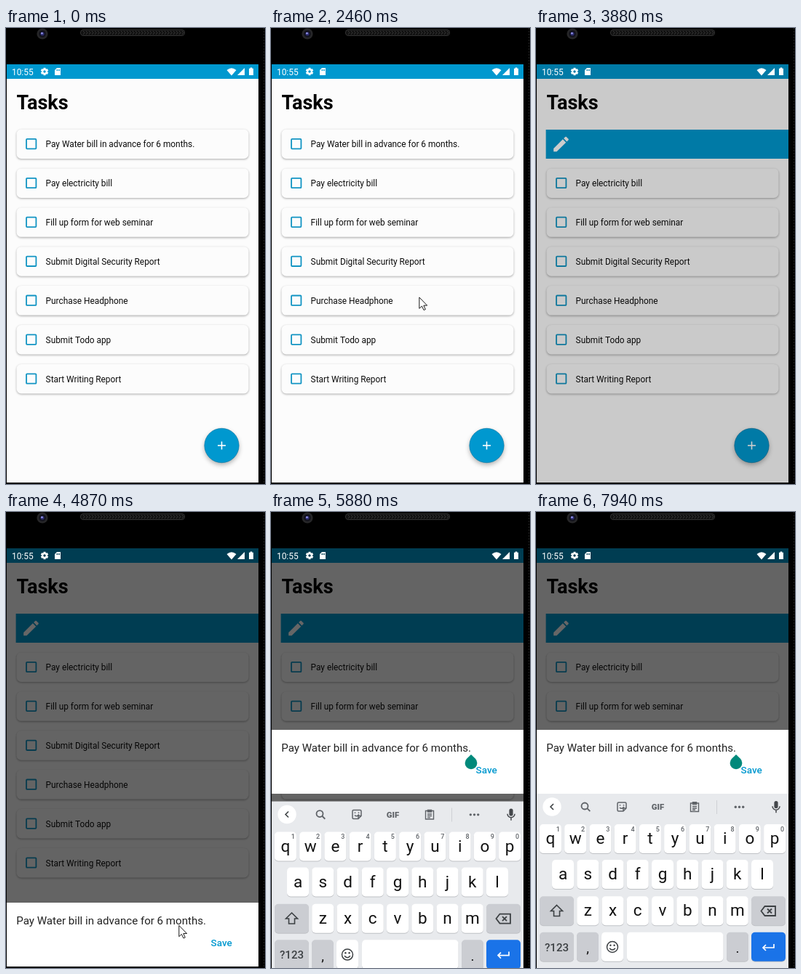
Write an HTML page with a canvas that moves like this. It is 356 by 628 pixels and loops after 8000 ms.

```html
<!DOCTYPE html>
<html lang="en">
<head>
<meta charset="utf-8">
<title>Tasks</title>
<style>
html, body { margin: 0; width: 100%; height: 100%; overflow: hidden; background: #000; }
canvas { display: block; width: 356px; height: 628px; }
</style>
</head>
<body>
<canvas id="stage"></canvas>
<script>
const W = 356, H = 628, LOOP = 8000, BEAT = 130;
const FONT = 'Roboto, sans-serif';
const BLUE = '#0098cf', PAPER = '#fcfcfc', TEAL = '#00897b', GREY = '#5f6368', INK = '#3c4043';
const SHEET = 88, BOARD = 240;
const DIM_AT = 3880, OPEN_AT = 4010, TYPE_AT = 5520;
const canvas = document.getElementById('stage');
const ctx = canvas.getContext('2d');
const ratio = window.devicePixelRatio || 1;
canvas.width = W * ratio;
canvas.height = H * ratio;

const tasks = [
  'Pay Water bill in advance for 6 months.',
  'Pay electricity bill',
  'Fill up form for web seminar',
  'Submit Digital Security Report',
  'Purchase Headphone',
  'Submit Todo app',
  'Start Writing Report'
];

// Pointer strokes: when each is visible, and the turning points as [ms, x, y].
const strokes = [
  { from: 410, to: 1720, path: [[410, 139, 570], [900, 73, 172], [1190, 76, 158], [1400, 112, 160], [1650, 200, 169]] },
  { from: 2080, to: 3450, path: [[2080, 290, 200], [2460, 209, 378], [2730, 56, 165], [3340, 82, 167]] },
  { from: 4150, to: TYPE_AT, path: [[4150, 256, 276], [4480, 66, 500], [4800, 236, 569], [5110, 276, 555]] }
];

const part = (t, a, b) => Math.min(1, Math.max(0, (t - a) / (b - a)));
const smooth = p => p * p * (3 - 2 * p);

const refresh = t => Math.floor((t + 20) / BEAT) * BEAT;

function pointerAt(t) {
  const stroke = strokes.find(s => t >= s.from && t < s.to);
  if (!stroke) return null;
  const now = refresh(t);
  let [, x, y] = stroke.path[0];
  stroke.path.forEach(([end, nx, ny], i) => {
    if (!i) return;
    const p = part(now, stroke.path[i - 1][0], end);
    x += (nx - x) * p;
    y += (ny - y) * p;
  });
  return [x, y];
}

// First a swipe that springs back, then one that throws the card away.
function swipeAt(t) {
  const now = refresh(t);
  const tried = 200 * smooth(part(now, 1400, 1850)) * (1 - part(now, 1950, 2200));
  return tried + 345 * part(now, 3120, 3590) ** 2.6;
}

function rect(x, y, w, h, color) {
  ctx.fillStyle = color;
  ctx.fillRect(x, y, w, h);
}

function round(x, y, w, h, r, color) {
  ctx.beginPath();
  ctx.roundRect(x, y, w, h, r);
  ctx.fillStyle = color;
  ctx.fill();
}

function disc(x, y, r, color) {
  ctx.beginPath();
  ctx.arc(x, y, r, 0, Math.PI * 2);
  ctx.fillStyle = color;
  ctx.fill();
}

function ring(x, y, r, color, line) {
  ctx.beginPath();
  ctx.arc(x, y, r, 0, Math.PI * 2);
  ctx.strokeStyle = color;
  ctx.lineWidth = line;
  ctx.stroke();
}

function text(str, x, y, size, color, weight = 400, align = 'left') {
  ctx.font = `${weight} ${size}px ${FONT}`;
  ctx.textAlign = align;
  ctx.fillStyle = color;
  ctx.fillText(str, x, y);
}

function icon(path, x, y, color, line, scale = 1) {
  ctx.save();
  ctx.translate(x, y);
  ctx.scale(scale, scale);
  const p = new Path2D(path);
  if (line) {
    ctx.strokeStyle = color;
    ctx.lineWidth = line;
    ctx.stroke(p);
  } else {
    ctx.fillStyle = color;
    ctx.fill(p, 'evenodd');
  }
  ctx.restore();
}

function shadowed(blur, dy, alpha, draw) {
  ctx.save();
  ctx.shadowColor = `rgba(0,0,0,${alpha})`;
  ctx.shadowBlur = blur * ratio;
  ctx.shadowOffsetY = dy * ratio;
  draw();
  ctx.restore();
}

function phone() {
  rect(0, 0, W, H, '#000');
  disc(50, 8, 7.6, '#262628');
  disc(50, 8, 4.8, '#12121c');
  disc(50, 8, 2.6, '#2d2d70');
  disc(49.4, 7.3, 1.3, '#9a9af0');
  round(102, 2, 144, 9, 4.5, '#333');
  round(103, 3, 142, 7, 3.5, '#111');
  ctx.strokeStyle = '#3a3a3a';
  ctx.lineWidth = 1;
  ctx.beginPath();
  for (let x = 106; x < 243; x += 4) {
    ctx.moveTo(x, 4);
    ctx.lineTo(x + 2, 6.5);
    ctx.lineTo(x, 9);
  }
  ctx.stroke();
  for (let y = 0; y < H; y += 4) rect(354, y, 1, 2, '#222');
}

function statusIcons() {
  const c = '#fff';
  text('10:55', 8, 65, 11.9, c);
  ctx.save();
  ctx.translate(53, 60);
  for (let i = 0; i < 6; i++) {
    rect(-1.5, -5.2, 3, 3, c);
    ctx.rotate(Math.PI / 3);
  }
  ctx.restore();
  ring(53, 60, 2.8, c, 2.2);
  icon('M3 0H8V10H0V3ZM2.4 2V4H3.4V2ZM4.2 2V4H5.2V2ZM6 2V4H7V2Z', 67, 55, c);
  icon('M0 3Q6.5 -2.6 13 3L6.5 10.5Z', 303.5, 55, c);
  icon('M10 0V10H0Z', 318, 55, c);
  icon('M0 1.2H1.7V0H4.3V1.2H6V10.5H0Z', 334, 54.6, c);
}

function card(i, dx) {
  ctx.save();
  ctx.translate(dx, 139.5 + i * 53.9);
  shadowed(3, 1.1, 0.32, () => round(14.5, 0, 319, 40.5, 6.5, PAPER));
  ctx.strokeStyle = '#1194c3';
  ctx.lineWidth = 1.8;
  ctx.beginPath();
  ctx.roundRect(28, 13.4, 13.4, 13.4, 1);
  ctx.stroke();
  text(tasks[i], 54.6, 24.6, 11.85, '#0c0c0c');
  ctx.restore();
}

function page(dx) {
  rect(1, 50, 346, 576, PAPER);
  rect(1, 50, 346, 20, BLUE);
  text('Tasks', 14.5, 112, 27, '#000', 700);
  tasks.forEach((_, i) => card(i, i ? 0 : dx));
  if (dx > 0) {
    rect(13.6, 140, Math.min(334, dx + 6), 40, BLUE);
    icon('M3 17.25V21h3.75L17.81 9.94l-3.75-3.75zM20.71 7.04c.39-.39.39-1.02 0-1.41l-2.34-2.34c-.39-.39-1.02-.39-1.41 0l-1.83 1.83 3.75 3.75z',
      20.7, 146.2, '#fff', 0, 1.15);
  }
  shadowed(6, 3, 0.3, () => disc(296.5, 575, 23.8, BLUE));
  ring(296.5, 575, 23.7, '#0b6f96', 0.5);
  rect(291, 574.2, 11, 1.6, '#fff');
  rect(295.7, 569.5, 1.6, 11, '#fff');
}

function sheet(y, editing, blink) {
  rect(1, y, 346, SHEET, '#fff');
  text(tasks[0], 14.2, y + 30, 15.1, '#222');
  text('Save', 281.6, y + 59.5, 13.5, BLUE, 500);
  if (!editing) return;
  if (blink) rect(275, y + 14, 2, 20, TEAL);
  ctx.save();
  ctx.translate(275, y + 45.8);
  ctx.rotate(Math.PI / 4);
  round(-8.4, -8.4, 16.8, 16.8, [0, 8.4, 8.4, 8.4], TEAL);
  ctx.restore();
}

function key(x, y, w, color) {
  round(x, y + 1, w, 40, 5, '#bfc1c5');
  round(x, y, w, 40, 5, color);
}

function letters(row, y) {
  const pitch = 34.25, left = 174 - (row.length - 1) * pitch / 2;
  [...row].forEach((c, i) => {
    const x = left + i * pitch;
    key(x - 15, y, 30, '#fff');
    text(c, x, y + 27, 22.5, '#111', 400, 'center');
    if (row.length === 10) text((i + 1) % 10, x + 10.5, y + 9.6, 9, GREY, 500, 'center');
  });
}

function toolbar() {
  disc(22, 18, 12.7, '#fff');
  icon('M2 -4L-2 0L2 4', 22, 18, INK, 1.6);
  ring(67, 17, 4.5, GREY, 1.8);
  icon('M3 3L7 7', 67.3, 17.2, GREY, 1.8);
  icon('M-6 -4.5Q-6 -6 -4.5 -6H4.5Q6 -6 6 -4.5V2L2 6H-4.5Q-6 6 -6 4.5ZM6 2H2V6M-3 1Q0 4 3 0M-2.5 -3V-1.5M2.5 -3V-1.5',
    118, 18, GREY, 1.5);
  text('GIF', 167.5, 22, 11.3, GREY, 900, 'center');
  icon('M-5.5 -5H5.5V6.5H-5.5ZM-2.5 -6.2H2.5V-3.5H-2.5ZM-3 -.5H3M-3 2H3M-3 4.3H1', 218, 18, GREY, 1.4);
  rect(248, 9, 1, 19, '#cfd1d5');
  for (let i = -1; i < 2; i++) disc(279.5 + i * 5.2, 18.3, 1.7, GREY);
  round(327.4, 10, 5.2, 10, 2.6, '#44474b');
  icon('M-5 -1A5 5 0 0 0 5 -1M0 4V8', 330, 18.2, '#44474b', 1.5);
}

function keyboard(y) {
  const soft = '#cbcdd2', row = i => 42 + i * 49.6;
  ctx.save();
  ctx.translate(0, y);
  rect(1, 0, 346, BOARD, '#e8eaed');
  toolbar();
  ['qwertyuiop', 'asdfghjkl', 'zxcvbnm'].forEach((keys, i) => letters(keys, row(i) - (i === 1 ? 0.6 : 0)));

  for (const i of [2, 3]) {
    key(5, row(i), 47, soft);
    key(296, row(i), 47, i === 2 ? soft : '#1a73e8');
  }
  icon('M0 -8L8 0H4V7H-4V0H-8Z', 28.5, 161.5, INK, 1.6);
  icon('M-10 0L-5 -6.5H9.5V6.5H-5ZM-1.5 -3L4.5 3M4.5 -3L-1.5 3', 319.5, 161.5, INK, 1.8);
  text('?123', 28.5, 216.5, 15, INK, 500, 'center');
  icon('M8 -5V0H-7M-3 -4L-7 0L-3 4', 319, 212, '#fff', 1.7);

  const y4 = row(3);
  for (const [mark, x] of [[',', 71], ['.', 277]]) {
    key(x - 15, y4, 30, soft);
    text(mark, x, 219, 19, '#111', 400, 'center');
  }
  key(90, y4, 30, '#fff');
  ring(105, 211, 7.5, INK, 1.5);
  icon('M-4 1.8Q0 6.4 4 1.8', 105, 211, INK, 1.5);
  for (const side of [-1, 1]) disc(105 + side * 2.6, 208.7, 1.2, INK);
  key(125, y4, 132.5, '#fff');
  ctx.restore();
}

function arrow(x, y) {
  const shape = 'M.5 .8V16.2L4.1 12.9L6.7 18.4L9 17.4L6.5 12H11.3Z';
  icon(shape, x, y, '#fff');
  icon(shape, x, y, '#1a1a1a', 1);
}

function draw(t) {
  const typing = t >= TYPE_AT;
  const rise = 1 - (1 - part(refresh(t), TYPE_AT, TYPE_AT + 510)) ** 3;
  const blink = Math.floor((t - 5920) / 505) % 2 === 1;
  const pointer = pointerAt(t);

  ctx.setTransform(ratio, 0, 0, ratio, 0, 0);
  phone();
  ctx.save();
  ctx.beginPath();
  ctx.rect(1, 50, 346, 576);
  ctx.clip();
  page(swipeAt(t));
  if (t >= DIM_AT) rect(1, 50, 346, 576, `rgba(0,0,0,${t < OPEN_AT ? 0.2 : 0.6})`);
  statusIcons();
  if (t >= OPEN_AT) sheet(typing ? 300 : 538, typing, blink);
  ctx.restore();
  if (typing) keyboard(H - BOARD * rise);
  if (pointer) arrow(...pointer);
}

const start = performance.now();
function tick() {
  draw((performance.now() - start) % LOOP);
  requestAnimationFrame(tick);
}
tick();
</script>
</body>
</html>
```
